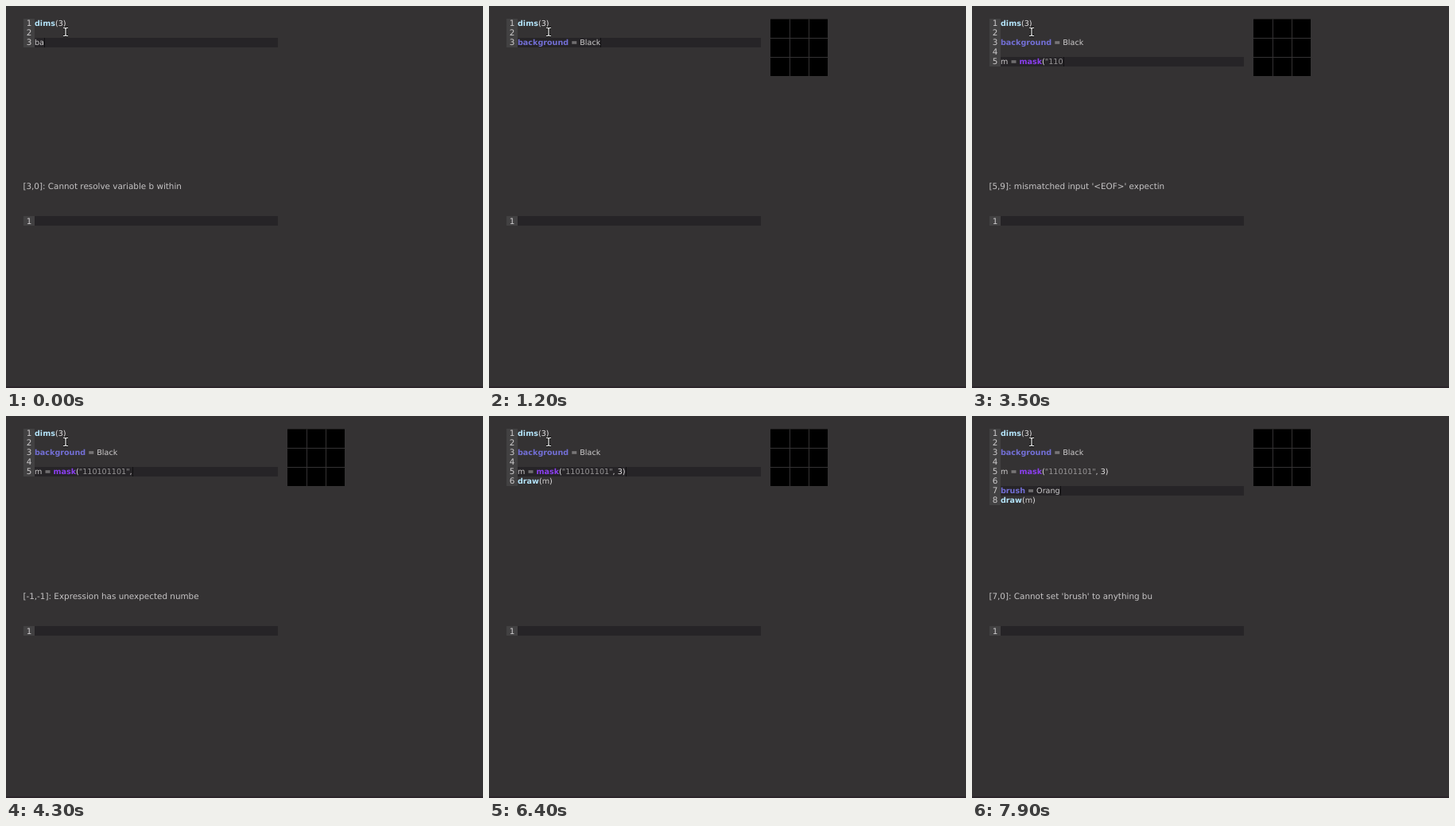
Write an HTML page that moves like this. It is 600 px wide and 480 px high and loops after 8 s.

```html
<!DOCTYPE html>
<html lang="en">
<head>
<meta charset="utf-8">
<title>Live code editor</title>
<style>
  html, body { margin: 0; width: 100%; height: 100%; overflow: hidden; background: #343233; }
  svg { display: block; }
  text { font: 9.6px "DejaVu Sans", Verdana, sans-serif; fill: #cdcbcc; white-space: pre; text-rendering: geometricPrecision; }
  .number { font-size: 10.4px; text-anchor: middle; }
  #message { font-size: 10.4px; fill: #c6c4c5; }
  .gutter { fill: #424142; }
  .active { fill: #262427; }
  .call, .setting, .mask { font-weight: bold; }
  .call { fill: #b4e4fa; }
  .setting { fill: #736fd6; }
  .mask { fill: #8b3ff0; }
  .string { fill: #979596; }
  .bright { fill: #e6e4e5; }
</style>
</head>
<body>
<svg width="600" height="480" viewBox="0 0 600 480">
  <rect y="478" width="600" height="2" fill="#2b252a"/>
  <rect class="gutter" id="gutter" x="22" y="16" width="14"/>
  <rect class="active" id="active" x="36" width="306" height="12"/>
  <g id="code"></g>
  <rect id="caret" width="1" height="12" fill="#111012"/>
  <text id="message" x="21.4" y="230"></text>
  <rect class="gutter" x="22" y="264" width="14" height="12"/>
  <rect class="active" x="36" y="264" width="306" height="12"/>
  <text class="number" x="29" y="274">1</text>
  <g id="grid">
    <rect x="354" y="16.5" width="72" height="71.5"/>
    <path d="M378.5 16.5V88M402.5 16.5V88M354 40.5H426M354 64.5H426" stroke="#343233"/>
  </g>
  <g fill="none">
    <path id="beam" d="M72 27.5H74L75 28.5L76 27.5H78M75 28.5V36.5M72 37.5H74L75 36.5L76 37.5H78" stroke="#111" stroke-width="2.6"/>
    <use href="#beam"/>
    <path d="M72 27.5H74L75 28.5L76 27.5H78M75 28.5V36.5M72 37.5H74L75 36.5L76 37.5H78" stroke="#f4f4f4" stroke-width="1.2"/>
  </g>
</svg>
<script>
const LOOP = 8000, TOP = 16, ROW = 12;
const $ = id => document.getElementById(id);

// Each edit: time, row, new text of that row; the caret goes to its end.
const edits = [[0, 1, "dims(3)"], [0, 2, ""]];
const type = (start, row, ...texts) =>
  texts.forEach((text, i) => edits.push([start + i * 100, row, text]));

const bits = "110101101", open = 'm = mask("', shape = open + bits + '"';
type(0, 3, "ba", "bac", "back", "backgr", "backgro", "backgrou", "background",
  "background ", "background =", "background = B", "background = Bla", "background = Black");
type(1500, 4, "");
type(1600, 5, "");
type(2400, 5, "m ", "m = ", "m = m", "m = ma", "m = mas", "m = mask", "m = mask(", open);
type(3300, 5, ...[...bits].map((_, i) => open + bits.slice(0, i + 1)));
type(4200, 5, shape, shape + ",", shape + ", ", shape + ", 3");
type(4700, 5, shape + ", 3)");
type(5000, 6, "");
type(5200, 6, "d", "dr", "draw", "draw(", "draw(m)");
type(6200, 5, shape + ", 3)");
type(6600, 7, "draw(m)");
type(6600, 6, "");
type(6800, 8, "draw(m)");
type(6800, 7, "");
type(7100, 7, "b", "br", "bru", "brus", "brush ", "brush =", "brush = O", "brush = Ora", "brush = Orang");

const unknown = name => `Cannot resolve variable ${name} within`;
const mismatch = "mismatched input '<EOF>' expectin";
const messages = [
  [0, "[3,0]: " + unknown("b")],
  [700, "[3,11]: " + mismatch.slice(0, -1)],
  [1000, "[3,0]: Cannot set 'background' to anythi"],
  [1200, ""],
  [2500, "[5,4]: " + mismatch],
  [2800, "[5,4]: " + unknown("m")],
  [3100, "[5,9]: " + mismatch],
  [4300, "[-1,-1]: Expression has unexpected numbe"],
  [4500, "[5,23]: missing ')' at '<EOF>'"],
  [4800, ""],
  [5300, "[6,0]: " + unknown("d")],
  [5500, "[6,0]: No method associated with name 'd"],
  [5800, ""],
  [7200, "[7,0]: " + unknown("b")],
  [7600, "[7,7]: " + mismatch],
  [7800, "[7,0]: Cannot set 'brush' to anything bu"]
];

const styles = [
  ["call", /^(dims|draw)$/], ["setting", /^(background|brush)$/],
  ["mask", /^mask$/], ["string", /^"/], ["bright", /^[()\d]/]
];
const paint = text => text.replace(/"[^"]*"?|\w+|[()]/g, token => {
  const style = styles.find(([, test]) => test.test(token));
  return style ? `<tspan class="${style[0]}">${token}</tspan>` : token;
});

let shown = "";
function render(time) {
  const past = edits.filter(([at]) => at <= time);
  const message = messages.filter(([at]) => at <= time).pop()[1];
  const key = past.length + message;
  if (key === shown) return;
  shown = key;

  const lines = [];
  for (const [, row, text] of past) lines[row - 1] = text;
  const row = past[past.length - 1][1], y = TOP + (row - 1) * ROW;

  $("code").innerHTML = lines.map((text, i) => {
    const base = TOP + i * ROW + 9;
    return `<text class="number" x="29" y="${base}">${i + 1}</text>` +
      `<text class="line" x="36" y="${base}">${paint(text)}</text>`;
  }).join("");
  $("gutter").setAttribute("height", lines.length * ROW);
  $("active").setAttribute("y", y);
  $("caret").setAttribute("y", y);
  const line = document.querySelectorAll(".line")[row - 1];
  $("caret").setAttribute("x", Math.round(36 + line.getComputedTextLength()));
  $("message").textContent = message;
  $("grid").style.display = time >= 1200 ? "" : "none";
}

const start = performance.now();
function tick() {
  render((performance.now() - start) % LOOP);
  requestAnimationFrame(tick);
}
tick();
</script>
</body>
</html>
```
